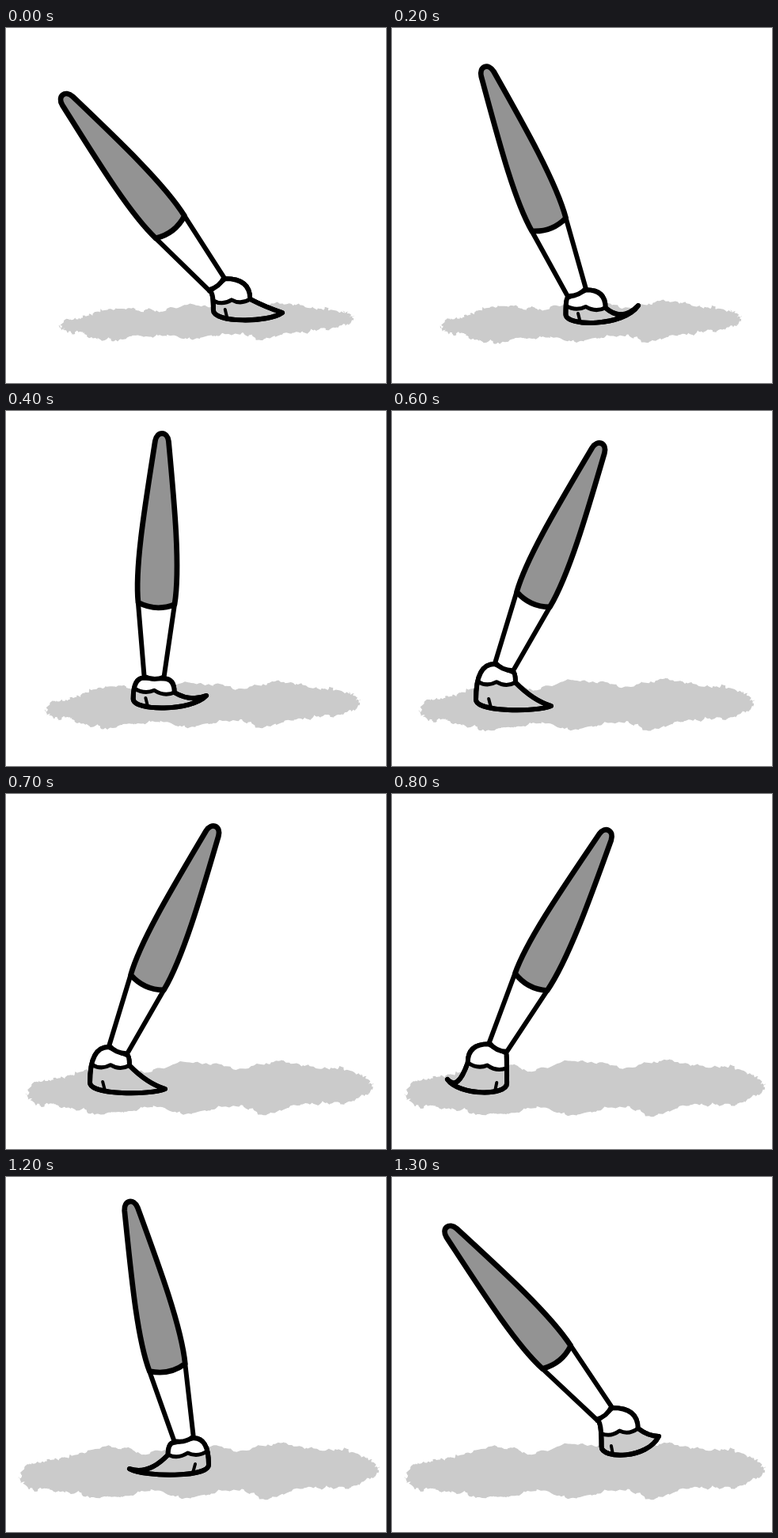
An HTML page with a canvas for the animation above (1.4 s loop, 480x449 px).

```html
<!DOCTYPE html>
<html lang="en">
<head>
<meta charset="utf-8">
<title>Paintbrush</title>
<style>
html, body { margin: 0; height: 100%; overflow: hidden; background: #fff; }
canvas { display: block; }
</style>
</head>
<body>
<canvas id="stage" width="480" height="449"></canvas>
<script>
const ctx = document.getElementById('stage').getContext('2d');
const STEP = 100, STEPS = 14, PAINT = '#cbcbcb';

// Both have their origin at the lower end of the ferrule
const handle = new Path2D('M-23-95C-29-140-18-220-8-300C-6-313 7-313 9-300C19-220 29-140 23-94Q0-84-23-95Z');
const ferrule = new Path2D('M-23-94L-12.5-2Q0 4 12.5-2L23-94Z');

// step: ferrule x, y, lean in degrees, floor y, hair tip x, y, curl of the tip
const poses = {
  0: [267, 325, -39.2, 369, 349, 360, 2],
  2: [234, 336, -22.3, 374, 311, 351, 20],
  4: [187, 338, 1.8, 376, 253, 360, 10],
  6: [141, 325, 23.4, 377, 201, 373, 8],
  8: [133, 322, 26.9, 378, 70, 361, 26],
  10: [182, 329, 3.1, 377, 113, 370, 17],
  12: [225, 333, -13, 376, 156, 369, 17],
  13: [269, 300, -40.3, 353, 337, 328, 5]
};

const mix = (a, b, k) => a.map((v, i) => v + (b[i] - v) * k);
const side = p => Math.sign(p[4] - p[0]);

// The hair flips over at once, all else moves evenly between poses
function poseAt(step) {
  const keys = Object.keys(poses).map(Number);
  const from = keys.findLast(key => key <= step);
  const to = keys.find(key => key >= step);
  const a = poses[from], b = poses[to];
  return from === to || side(a) !== side(b) ? a : mix(a, b, (step - from) / (to - from));
}

function random(seed) {
  return () => (seed = (seed * 16807) % 2147483647) / 2147483647;
}

// A sloping, lumpy oval with a ragged edge that grows for eight steps
function drawPuddle(step) {
  const grow = Math.min(step / 8, 1), rnd = random(77), points = 480;
  const left = 70 - 51 * grow ** 1.5, right = 438 + 32 * grow ** 2;
  let driftX = 0, driftY = 0;
  ctx.beginPath();
  for (let i = 0; i < points; i++) {
    const angle = 2 * Math.PI * i / points;
    const u = -Math.cos(angle), v = -Math.sin(angle);
    const x = (left + right + (right - left) * u) / 2;
    const axis = 373 + 4 * grow - 5 * u;
    const lump = (2 + 2 * grow) * Math.cos((x - 232) / 103 * 2 * Math.PI);
    const height = (v < 0 ? 20 + 15 * grow : 18 + 7 * grow) + lump;
    driftX = driftX * 0.8 + (rnd() - 0.5) * 4;
    driftY = driftY * 0.8 + (rnd() - 0.5) * 4;
    ctx.lineTo(x + driftX, axis + height * v * Math.sqrt(1 + u * u) + driftY);
  }
  ctx.fillStyle = PAINT;
  ctx.fill();
}

function shape(path, fill, width) {
  ctx.fillStyle = fill;
  ctx.lineWidth = width;
  ctx.fill(path);
  ctx.stroke(path);
}

function drawHair([x, y, lean, floor, tipX, tipY, curl]) {
  const dir = Math.sign(tipX - x), bend = dir * lean;
  const angle = lean * Math.PI / 180;
  const dx = dir * 12.5 * Math.cos(angle), dy = dir * 12.5 * Math.sin(angle);
  const back = [x - dx, y - dy], front = [x + dx, y + dy], tip = [tipX, tipY];
  const heel = [back[0] - dir * (13 + 0.45 * bend), floor - 12];
  const shoulder = [front[0] + dir * (14 - 0.45 * bend), front[1] + 18 - 0.2 * bend];
  const backCorner = [heel[0], back[1]], frontCorner = [shoulder[0], front[1]];
  const along = k => heel[0] + (tipX - heel[0]) * k;

  const outline = new Path2D();
  outline.moveTo(...back);
  outline.quadraticCurveTo(...backCorner, ...heel);
  outline.bezierCurveTo(heel[0], floor + 4, along(0.8), floor + 4, ...tip);
  const [hollowX, hollowY] = mix(tip, shoulder, 0.5);
  outline.quadraticCurveTo(hollowX, hollowY + curl, ...shoulder);
  outline.quadraticCurveTo(...frontCorner, ...front);
  outline.closePath();

  // Scalloped edge of the paint, starting part of the way down the back
  const k = 0.7, bendPoint = mix(back, backCorner, k);
  const start = mix(bendPoint, mix(backCorner, heel, k), k);
  const edge = new Path2D();
  edge.moveTo(...start);
  for (const t of [0.25, 0.75]) {
    const [cx, cy] = mix(start, shoulder, t);
    edge.quadraticCurveTo(cx, cy + 7, ...mix(start, shoulder, t + 0.25));
  }
  const cap = new Path2D(edge);
  cap.quadraticCurveTo(...frontCorner, ...front);
  cap.lineTo(...back);
  cap.quadraticCurveTo(...bendPoint, ...start);

  const bristle = new Path2D();
  bristle.moveTo(along(0.17), floor - 13);
  bristle.lineTo(along(0.2), floor - 2);

  shape(outline, PAINT, 6);
  ctx.fillStyle = '#fff';
  ctx.fill(cap);
  ctx.stroke(outline);
  ctx.lineWidth = 5;
  ctx.stroke(edge);
  ctx.lineWidth = 4;
  ctx.stroke(bristle);
}

function drawBrush(step) {
  const pose = poseAt(step), [x, y, lean] = pose;
  ctx.lineJoin = ctx.lineCap = 'round';
  drawHair(pose);
  ctx.save();
  ctx.translate(x, y);
  ctx.rotate(lean * Math.PI / 180);
  shape(ferrule, '#fff', 6);
  shape(handle, '#939393', 6.8);
  ctx.restore();
}

function frame(now) {
  const step = Math.floor(now / STEP) % STEPS;
  ctx.fillStyle = '#fff';
  ctx.fillRect(0, 0, 480, 449);
  drawPuddle(step);
  drawBrush(step);
  requestAnimationFrame(frame);
}
requestAnimationFrame(frame);
</script>
</body>
</html>
```
